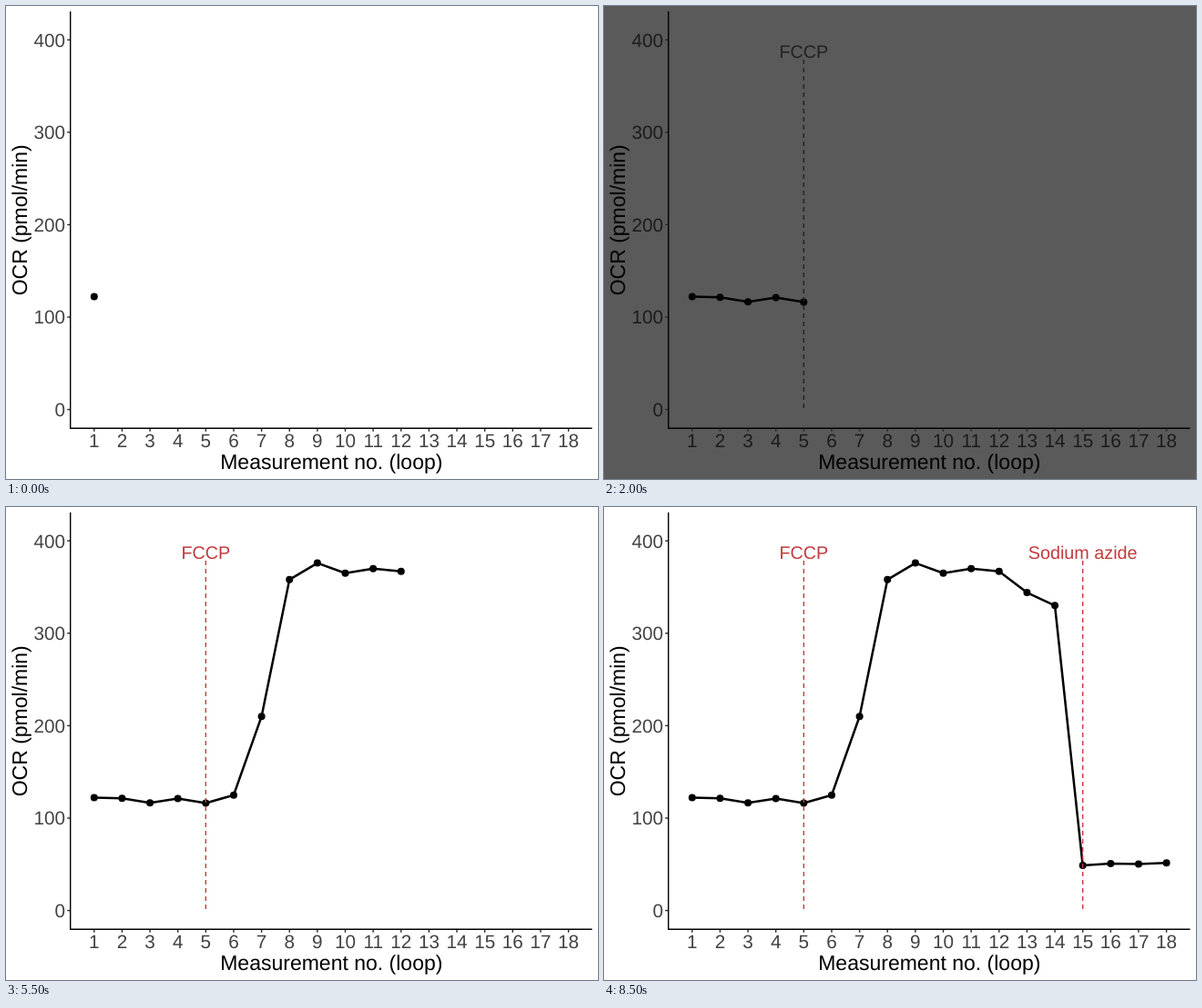
Recreate the animation shown at these times as an HTML page. Size 650 px wide and 520 px high, loop 9 s.

```html
<!DOCTYPE html>
<html lang="en">
<head>
<meta charset="utf-8">
<title>OCR over measurements</title>
<style>
  html, body { margin: 0; width: 100%; height: 100%; overflow: hidden; background: #fff; }
  svg {
    --paper: #fff; --tick: #424242; --accent: #c13b3f;
    display: block; width: 650px; height: 520px; background: var(--paper);
    font-family: "Liberation Sans", Arial, sans-serif;
    text-rendering: geometricPrecision;
  }
  svg.dim { --paper: #5a5a5a; --tick: #1c1c1c; --accent: #222; }
  text { text-anchor: middle; }
  .axis { stroke: #000; stroke-width: 1.4; fill: none; }
  .tick { stroke: #2b2b2b; stroke-width: 1.4; }
  .label { font-size: 20.7px; fill: var(--tick); }
  .end { text-anchor: end; }
  .title { font-size: 23px; }
  .curve { fill: none; stroke: #000; stroke-width: 2.5; stroke-linejoin: round; }
  .note { font-size: 19.8px; fill: var(--accent); }
  .marker { stroke: var(--accent); stroke-width: 1.4; stroke-dasharray: 5 4; }
</style>
</head>
<body>
<svg id="chart" viewBox="0 0 650 520">
  <g id="ticks"></g>
  <path class="axis" d="M70.7 6V464.3H643.5"/>
  <text class="title" x="357.3" y="509">Measurement no. (loop)</text>
  <text class="title" transform="translate(22.5 235.3) rotate(-90)">OCR (pmol/min)</text>
  <polyline id="curve" class="curve"/>
  <g id="dots"></g>
  <g id="notes"></g>
</svg>
<script>
  const STEP_MS = 500;
  const DIM_STEP = 4;
  const values = [122.2, 121.4, 116.5, 121.2, 116.3, 124.9, 210, 358, 376,
                  365, 370, 367, 344, 330, 48.8, 50.7, 50.2, 51.6];
  const injections = [{ at: 5, name: "FCCP" }, { at: 15, name: "Sodium azide" }];

  const byId = id => document.getElementById(id);
  const xOf = n => 96.8 + 30.635 * (n - 1);
  const yOf = v => 443.6 - 1.016 * v;

  function add(parent, tag, attrs, text = "") {
    const node = document.createElementNS("http://www.w3.org/2000/svg", tag);
    for (const key in attrs) node.setAttribute(key, attrs[key]);
    node.textContent = text;
    return parent.appendChild(node);
  }

  const ticks = byId("ticks");
  for (let v = 0; v <= 400; v += 100) {
    const y = yOf(v);
    add(ticks, "line", { class: "tick", x1: 67.2, x2: 70.7, y1: y, y2: y });
    add(ticks, "text", { class: "label end", x: 65, y: y + 7.4 }, v);
  }
  values.forEach((_, i) => {
    const x = xOf(i + 1);
    add(ticks, "line", { class: "tick", x1: x, x2: x, y1: 464.3, y2: 467.8 });
    add(ticks, "text", { class: "label", x, y: 484.8 }, i + 1);
  });

  const points = values.map((v, i) => [xOf(i + 1), yOf(v)]);
  const dots = points.map(([cx, cy]) => add(byId("dots"), "circle", { cx, cy, r: 4 }));
  const notes = injections.map(({ at, name }) => {
    const x = xOf(at);
    const group = add(byId("notes"), "g", {});
    add(group, "line", { class: "marker", x1: x, x2: x, y1: 59, y2: yOf(0) });
    add(group, "text", { class: "note", x, y: 56.5 }, name);
    return group;
  });

  const show = (node, on) => node.setAttribute("visibility", on ? "visible" : "hidden");
  let shownStep = -1;

  function draw(now) {
    const step = Math.floor(now / STEP_MS) % values.length;
    if (step !== shownStep) {
      shownStep = step;
      byId("chart").classList.toggle("dim", step === DIM_STEP);
      byId("curve").setAttribute("points", points.slice(0, step + 1).join(" "));
      dots.forEach((dot, i) => show(dot, i <= step));
      notes.forEach((note, i) => show(note, injections[i].at <= step + 1));
    }
  }

  const start = performance.now();
  function tick() {
    draw(performance.now() - start);
    requestAnimationFrame(tick);
  }
  tick();
</script>
</body>
</html>
```
